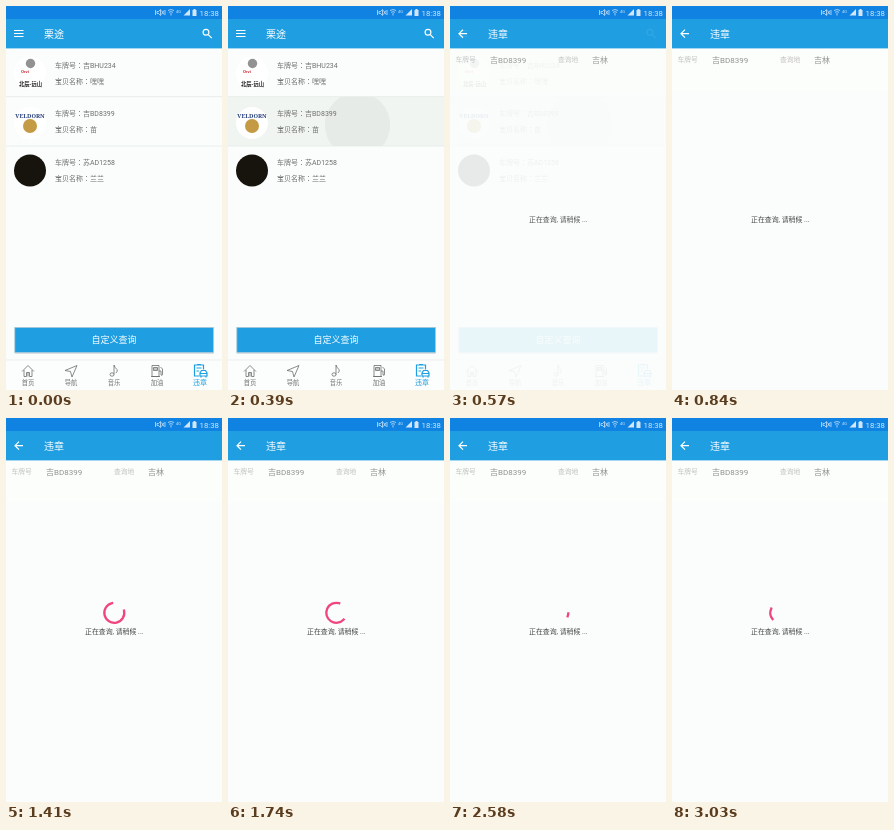
Recreate the animation shown at these times as an HTML page. Size 216 by 384 pixels, loop 3.06 s.

```html
<!DOCTYPE html>
<html lang="zh-CN">
<head>
<meta charset="utf-8">
<style>
html, body { margin: 0; height: 100%; overflow: hidden; background: #fbfefc; }
svg { display: block; width: 100vw; height: 100vh; }
text { font-family: Roboto, "Noto Sans CJK SC", "Noto Sans CJK", sans-serif; white-space: pre; }
.colon { font-family: "Noto Sans CJK TC", "Noto Sans CJK", sans-serif; }
.line { fill: none; stroke: #6c6c6c; stroke-width: .8; }
.white { fill: none; stroke: #fff; stroke-width: 1.2; }
.status { fill: none; stroke: #d3e6f8; stroke-width: .75; }
</style>
</head>
<body>
<svg id="stage" viewBox="0 0 216 384"></svg>
<script>
const LOOP = 3060, BLUE = '#1f9fe2', PALE = '#d3e6f8';

const text = (x, y, size, fill, s, extra = '') =>
  `<text x="${x}" y="${y}" font-size="${size}" fill="${fill}" ${extra}>${s}</text>`;
const rect = (x, y, w, h, fill, extra = '') =>
  `<rect x="${x}" y="${y}" width="${w}" height="${h}" fill="${fill}" ${extra}/>`;
const circle = (x, y, r, fill, extra = '') =>
  `<circle cx="${x}" cy="${y}" r="${r}" fill="${fill}" ${extra}/>`;
const path = (d, cls = 'line', extra = '') => `<path d="${d}" class="${cls}" ${extra}/>`;
const MID = 'text-anchor="middle"';

const toolbar = (title, icon) =>
  rect(0, 13, 216, 29.4, BLUE) + text(38, 31.5, 10, '#fff', title, 'font-weight="500"') + path(icon, 'white');

const field = (y, label, value) =>
  text(49, y, 7, '#707070', `${label}<tspan class="colon" lang="zh-Hant">：</tspan>${value}`);
const row = (y, plate, name) => field(y + 19.5, '车牌号', plate) + field(y + 35.5, '宝贝名称', name);

const tab = (x, label, icon, on) =>
  `<g transform="translate(${x} 365)">${path(icon, 'line', on ? `style="stroke:${BLUE};stroke-width:1.2"` : '')}</g>` +
  text(x, 379.3, on ? 7 : 6.3, on ? BLUE : '#6c6c6c', label, MID + (on ? ' font-weight="500"' : ''));

const statusBar = rect(0, 0, 216, 13, '#1083e2') +
  path('M151 5.500h1.500l2-2v6l-2-2h-1.500zM155.500 4.500l2.500 4M158 4.500l-2.500 4M149.500 4v5M159 4v5', 'status') +
  path('M162 4.500q3-2 6 0M163 6.300q2-1.300 4 0M165 7v2.500', 'status') +
  text(170, 6.5, 4, PALE, '4G') +
  `<path d="M177.500 9.500h6.500v-6.500zM186.500 4h1v-1h2v1h1v6h-4z" fill="${PALE}"/>` +
  text(193.5, 9.6, 7.8, PALE, '18:38');

const listPage = rect(0, 42, 216, 342, '#fafdfb') +
  toolbar('栗途', 'M8 24.500h9.500M8 27.500h9.500M8 30.500h9.500M202.300 28.700l3.400 3.400') +
  circle(200, 26.3, 2.9, 'none', 'class="white"') +
  `<g id="press">${rect(0, 91, 216, 49, '#49704a', 'opacity=".055"')}
   <g clip-path="url(#rowClip)">${circle(129.5, 119, 32.6, '#404840', 'id="ripple" opacity=".06"')}</g></g>` +
  rect(0, 90.5, 216, .6, '#dfe3e0') + rect(0, 139.7, 216, .6, '#dfe3e0') +
  circle(24, 67, 16, '#fff') + circle(24.5, 57.5, 4.7, '#929292') +
  text(15, 67.2, 4.3, '#c4323c', 'Orvi', 'font-weight="700"') +
  text(24.5, 79.5, 5.3, '#222', '北辰-远山', MID + ' font-weight="700"') +
  circle(24, 117, 16, '#fff') + circle(24, 120, 7, '#c49a45') +
  text(24, 112, 5.8, '#253d78', 'VELDORN', MID + ' font-weight="700" style="font-family:\'Noto Serif\',serif"') +
  circle(24, 164.5, 16, '#17140e') +
  row(42, '吉BHU234', '嘿嘿') + row(90.6, '吉BD8399', '苗') + row(139.6, '苏AD1258', '兰兰') +
  rect(8.8, 321.4, 198.6, 25.2, BLUE, 'stroke="#a9c9d9" stroke-width=".8"') +
  rect(9, 347, 198.5, .8, '#cdd8dc') +
  text(108, 337.4, 9, '#fff', '自定义查询', MID) +
  rect(0, 354, 216, 30, '#fcfefd') + rect(0, 353.7, 216, .6, '#e0e4e2') +
  tab(22, '首页', 'M-6 .5L0-5.500L6 .5M-4-1V5.500H-1.500V1.500H1.500V5.500H4V-1M0 1.500V5.500') +
  tab(65, '导航', 'M6-5.500L-6-.5L-.5 .5L1 6z') +
  tab(108, '音乐', 'M0 3.500V-6Q1-3 3-1.500Q4 0 2 2M0 3.500a2 1.700 0 1 1-4 0a2 1.700 0 1 1 4 0') +
  tab(151, '加油', 'M-5 5.500V-5.500H2V5.500zM-6 5.500H3M-3.500-3.500H.5V-.5H-3.500zM-3.500-2H.5M2 0H4V4Q5.500 5 5.500 3V-2L3.500-4') +
  tab(194, '违章', 'M-1 5H-5.500V-6H3.500V-1.500M-3-6.500H1M-3.500-3H1.500M-3.500 0H-1M0 5V2L1.500-.5H5.500L7 2V5zM0 2.500H7M1 5V6.500M6 5V6.500', true);

const queryPage = rect(0, 13, 216, 371, '#fafdfc') + rect(0, 42, 216, 42, '#fcfefb') +
  toolbar('违章', 'M17 27.700H9M13 23.700L9 27.700L13 31.700') +
  text(5.5, 56.3, 6.8, '#c0c2c1', '车牌号') + text(40, 56.6, 8, '#909392', '吉BD8399') +
  text(108, 56.3, 6.8, '#c0c2c1', '查询地') + text(142, 56.6, 8, '#909392', '吉林');

const loading = text(108.3, 215.7, 6.9, '#484a49', '正在查询, 请稍候 ...', MID) +
  '<path id="arc" fill="none" stroke="#f0457f" stroke-width="2.300" stroke-linecap="square"/>';

const $ = id => document.getElementById(id);
$('stage').innerHTML = `<clipPath id="rowClip">${rect(0, 91, 216, 49, '#000')}</clipPath>
  ${listPage}<g id="query"><g id="sheet">${queryPage}</g>${loading}</g>${statusBar}`;

const clamp = v => Math.min(1, Math.max(0, v));

// Arc ends in degrees clockwise from the top: [ms, angle]
const TAIL = [[900, 20], [1410, 77], [1650, 102], [1880, 178], [2010, 262], [2100, 311],
  [2300, 395], [2700, 478], [3030, 591], [3060, 598]];
const HEAD = [[900, 20], [1100, 100], [1250, 300], [1410, 347], [2100, 409], [2700, 485],
  [3030, 654], [3060, 670]];

function along(keys, t) {
  const i = Math.max(1, keys.findIndex(k => k[0] >= t));
  const [t0, a] = keys[i - 1], [t1, b] = keys[i];
  return a + (b - a) * clamp((t - t0) / (t1 - t0));
}

function point(deg) {
  const a = deg * Math.PI / 180;
  return `${108.3 + 10 * Math.sin(a)} ${194.8 - 10 * Math.cos(a)}`;
}

function draw(t) {
  const press = clamp((t - 270) / 110);
  $('press').setAttribute('opacity', press);
  $('ripple').setAttribute('r', 12 + 20.6 * press);

  const slide = 30 * (1 - clamp((t - 407) / 190)) ** 5;
  $('query').setAttribute('opacity', clamp((t - 405) / 180));
  $('sheet').setAttribute('transform', `translate(0 ${slide})`);

  const tail = along(TAIL, t), head = along(HEAD, t);
  $('arc').setAttribute('d', t <= 900 ? '' :
    `M${point(tail)}A10 10 0 ${head - tail > 180 ? 1 : 0} 1 ${point(head)}`);
}

const start = performance.now();
function tick() {
  draw((performance.now() - start) % LOOP);
  requestAnimationFrame(tick);
}
tick();
</script>
</body>
</html>
```
